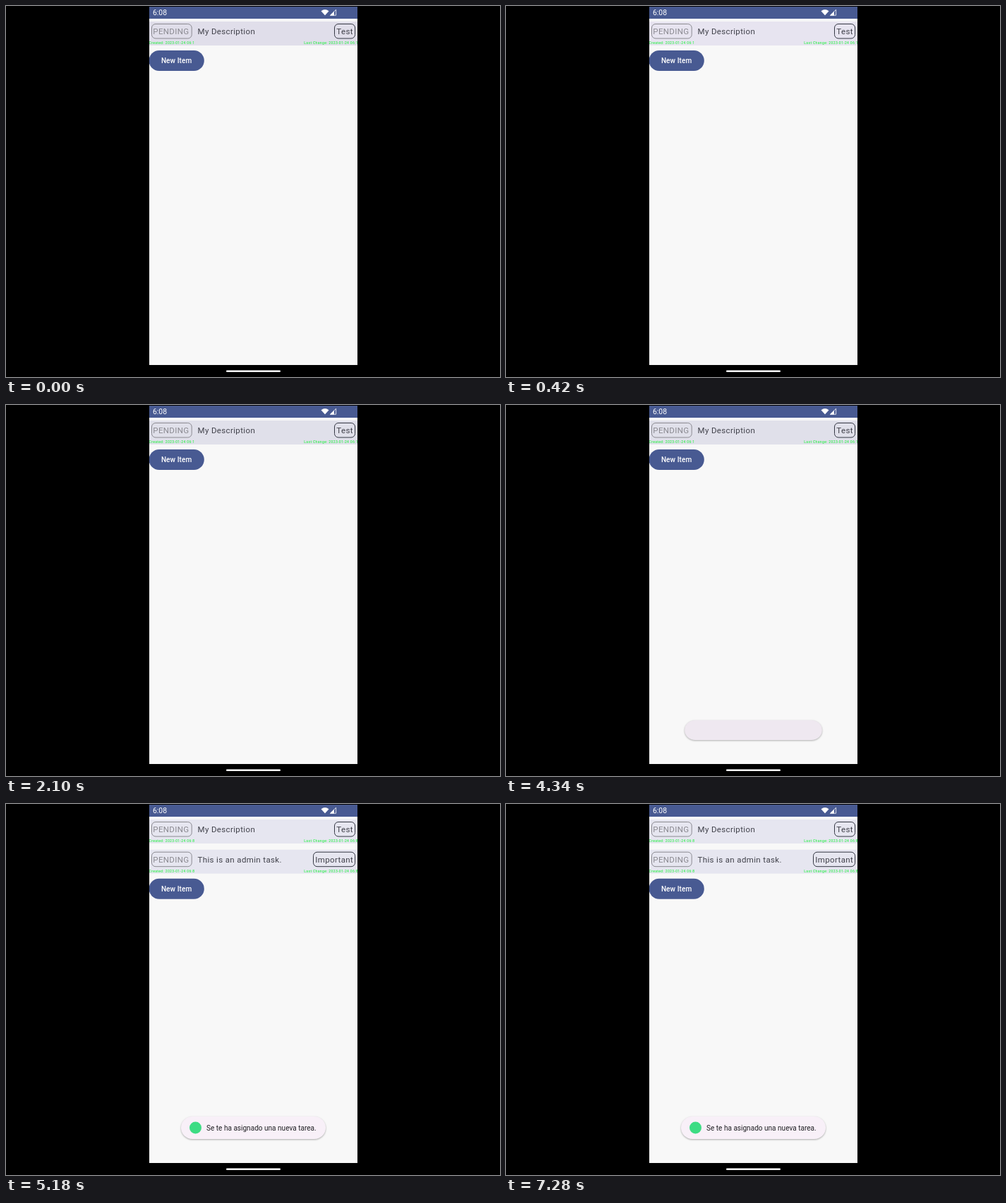
These frames come from a looping animation (700x526 px, 8280 ms). An HTML page:

```html
<!DOCTYPE html>
<html lang="en">
<head>
<meta charset="utf-8">
<title>Task list</title>
<style>
  html, body { margin: 0; width: 100%; height: 100%; overflow: hidden; background: #000; }
  svg { display: block; width: 700px; height: 526px; font-family: Roboto, sans-serif; }
  .label { font-size: 11.5px; letter-spacing: .36px; fill: #41424b; }
  .stamp { font-size: 5.02px; letter-spacing: .36px; fill: #0cf52c; }
  .pending { fill: #8b8a91; }
  .chip { fill: none; stroke: #353844; }
  .chip.muted { stroke: #8b8a91; }
  .button { font-size: 10.05px; font-weight: 500; letter-spacing: .07px; fill: #fff; }
  .toast-box { filter: drop-shadow(0 1px 1px #6668); }
</style>
</head>
<body>
<svg viewBox="0 0 700 526">
  <clipPath id="screen"><rect x="203" y="0" width="295" height="509"/></clipPath>
  <rect width="700" height="526"/>
  <g clip-path="url(#screen)">
    <rect x="203" y="1" width="295" height="508" fill="#f8f8f8"/>
    <rect x="203" y="1" width="295" height="17" fill="#485a92"/>
    <text x="208" y="13.2" font-size="10.4" fill="#fff">6:08</text>
    <path d="M446.5 7.2Q452 2.8 457.5 7.2L452 13.3Z" fill="#fff"/>
    <path d="M459 13.5L465 7.5V13.5Z" fill="#fff"/>
    <path d="M459.5 13.2L467.6 5.2V13.2Z" fill="none" stroke="#fff" stroke-width=".8"/>
    <g id="rows"></g>
    <g id="newItem">
      <rect x="202.5" y="63" width="78.3" height="29" rx="14.5" fill="#485a92"/>
      <text class="button" x="241.6" y="81.4" text-anchor="middle">New Item</text>
    </g>
    <g id="toast">
      <rect class="toast-box" x="248" y="443" width="205" height="32" rx="16"/>
      <g id="message">
        <circle cx="268.5" cy="459" r="8.5" fill="#3ddc84"/>
        <text x="284" y="463" font-size="10.05" fill="#202024">Se te ha asignado una nueva tarea.</text>
      </g>
    </g>
  </g>
  <rect x="312" y="516.5" width="77" height="2.6" rx="1.3" fill="#fff"/>
</svg>
<script>
  const LOOP = 8280, SETTLE = 140, TINT = 700, TOAST = 4340, ASSIGNED = 4480;
  const ROW_STEP = 42.7;
  const byId = id => document.getElementById(id);
  const show = (node, on) => node.setAttribute('visibility', on ? 'visible' : 'hidden');

  const chip = (x, width, kind) =>
    `<rect class="chip ${kind}" x="${x}" y="25.5" width="${width}" height="20.5" rx="5.5"/>`;

  const row = (index, description, tag, tagX) => `
    <g class="row" transform="translate(0 ${index * ROW_STEP})">
      <rect class="fill" x="203" y="22" width="295" height="34"/>
      ${chip(206.5, 56.7, 'muted')}
      <text class="label pending" x="208.3" y="40.2">PENDING</text>
      <text class="label" x="271.5" y="40.2">${description}</text>
      ${chip(tagX, 494.6 - tagX, '')}
      <text class="label" x="${tagX + 2.8}" y="40.2">${tag}</text>
      <text class="stamp" x="202.6" y="54.4">Created: 2023-01-24 06:<tspan class="minute"/></text>
      <text class="stamp" x="422.3" y="54.4">Last Change: 2023-01-24 06:<tspan class="minute"/></text>
    </g>`;

  byId('rows').innerHTML =
    row(0, 'My Description', 'Test', 465.5) +
    row(1, 'This is an admin task.', 'Important', 435.5);

  const [, secondRow] = document.querySelectorAll('.row');
  const fills = document.querySelectorAll('.fill');
  const minutes = document.querySelectorAll('.minute');
  const toastBox = document.querySelector('.toast-box');

  function rowColor(t) {
    if (t < SETTLE) return '#e0deea';
    if (t < TINT) return '#e7e4f0';
    return t < ASSIGNED ? '#e0e0ea' : '#e6e6f0';
  }

  function draw(now) {
    const t = now % LOOP;
    const assigned = t >= ASSIGNED;
    fills.forEach(fill => fill.setAttribute('fill', rowColor(t)));
    minutes.forEach(minute => minute.textContent = assigned ? '8' : '1');
    show(secondRow, assigned);
    byId('newItem').setAttribute('transform', `translate(0 ${assigned ? ROW_STEP : 0})`);

    // The toast opens slightly smaller and empty, then snaps to full size.
    show(byId('toast'), t >= TOAST);
    show(byId('message'), assigned);
    toastBox.setAttribute('fill', assigned ? '#f8f0f8' : '#efe8f0');
    byId('toast').setAttribute('transform',
      assigned ? '' : 'translate(350.5 461) scale(.95 .88) translate(-350.5 -459)');
  }

  const start = performance.now();
  function tick() {
    draw(performance.now() - start);
    requestAnimationFrame(tick);
  }
  tick();
</script>
</body>
</html>
```
